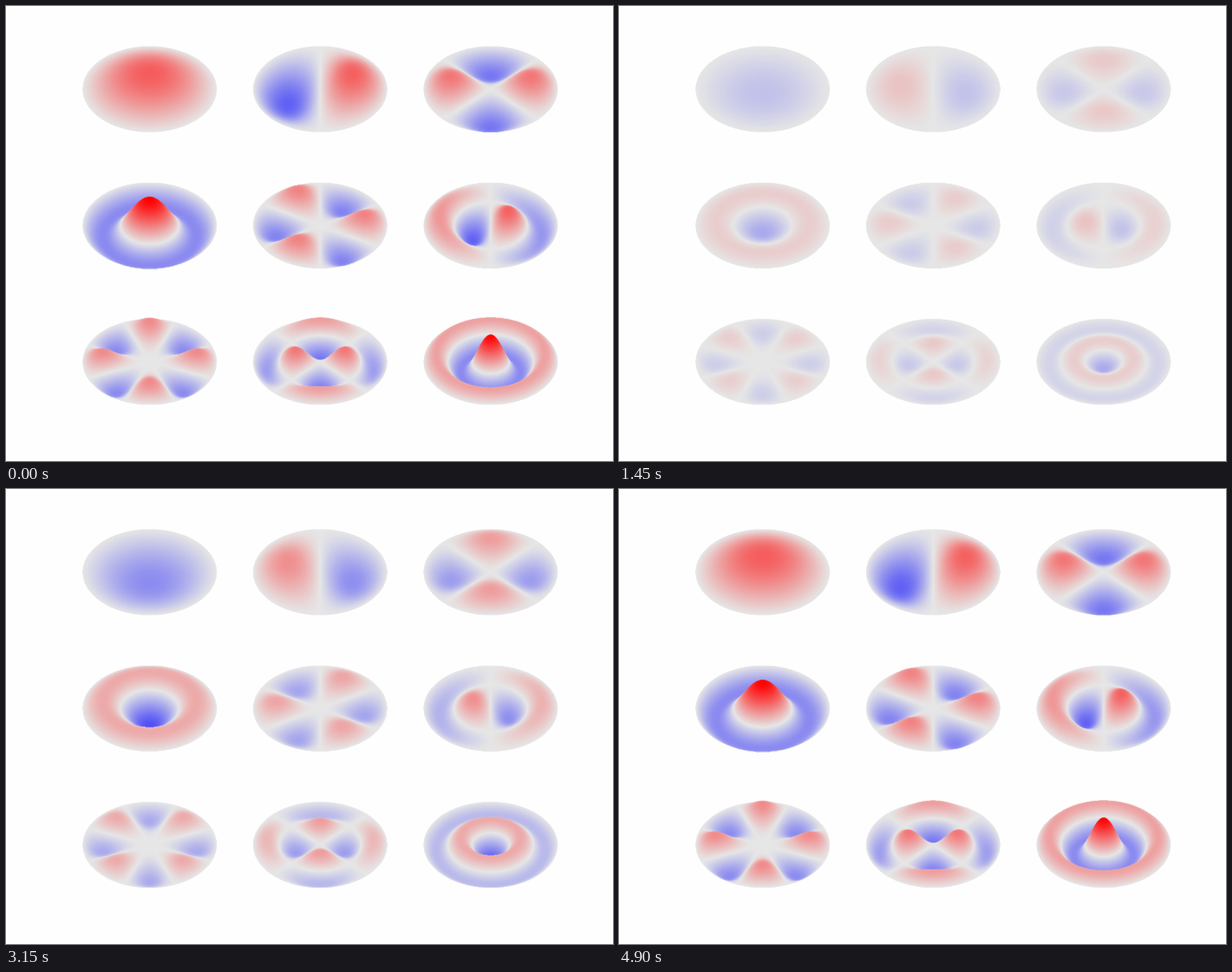
Recreate the animation shown at these times as an HTML page with a canvas. Size 700 by 525 pixels, loop 4950 ms.

```html
<!DOCTYPE html>
<html lang="en">
<head>
<meta charset="utf-8">
<title>Vibrating drum modes</title>
<style>
  html, body { margin: 0; width: 100%; height: 100%; overflow: hidden; background: #fefefe; }
  canvas { display: block; }
</style>
</head>
<body>
<canvas id="stage" width="700" height="525"></canvas>
<script>
const STEP = 50, STEPS = 99;            // ms per pose, poses per loop
const RX = 77.4, RY = 49.7, LIFT = 30.6; // tilted disk radii and height of a unit bump
const SCALE = 2;                         // supersampling
const PATCH_W = 160, PATCH_H = 130;
const LEVELS = 1000;                     // colour steps on each side of zero

const ctx = document.getElementById('stage').getContext('2d');
ctx.imageSmoothingQuality = 'high';

// Angular order, zero of the Bessel function, amplitude
const modes = [
  [0, 2.4048, 0.6], [1, 3.8317, 1], [2, 5.1356, 1],
  [0, 5.5201, 1],   [3, 6.3802, 1], [1, 7.0156, 1],
  [4, 7.5883, 1],   [2, 8.4172, 1], [0, 8.6537, 1]
];

// Blue - grey - red, packed as ABGR
const palette = new Uint32Array(2 * LEVELS + 1);
for (let i = 0; i < palette.length; i++) {
  const value = i / LEVELS - 1, size = Math.abs(value);
  const strong = Math.round(230 + 25 * size), weak = Math.round(230 * (1 - size));
  const [r, b] = value > 0 ? [strong, weak] : [weak, strong];
  palette[i] = (255 << 24 | b << 16 | weak << 8 | r) >>> 0;
}

function bessel(n, x) {
  const count = 32;
  let sum = 0;
  for (let i = 0; i < count; i++) {
    const a = (i + 0.5) * Math.PI / count;
    sum += Math.cos(n * a - x * Math.sin(a));
  }
  return sum / count;
}

// Each column of the disk holds heights ordered from back to front.
function buildColumns([order, zero, amplitude]) {
  const size = 2000;
  const radial = Float32Array.from({ length: size + 1 },
    (_, i) => amplitude * bessel(order, zero * i / size));
  const columns = [];
  for (let x = 0; x < PATCH_W * SCALE; x++) {
    const u = ((x + 0.5) / SCALE - PATCH_W / 2) / RX;
    if (Math.abs(u) >= 1) continue;
    const chord = Math.sqrt(1 - u * u);
    const count = Math.ceil(2 * chord * RY * SCALE) + 2;
    const heights = new Float32Array(count);
    for (let i = 0; i < count; i++) {
      const v = chord * (1 - 2 * i / (count - 1));
      const r = Math.min(1, Math.hypot(u, v));
      heights[i] = radial[Math.round(r * size)] * Math.cos(order * Math.atan2(v, u));
    }
    columns.push({ x, chord, heights });
  }
  return columns;
}

function createDrum(mode, index) {
  const canvas = document.createElement('canvas');
  canvas.width = PATCH_W * SCALE;
  canvas.height = PATCH_H * SCALE;
  const pen = canvas.getContext('2d');
  const image = pen.createImageData(canvas.width, canvas.height);
  return {
    canvas, pen, image,
    pixels: new Uint32Array(image.data.buffer),
    columns: buildColumns(mode),
    left: 165.7 + 196.6 * (index % 3) - PATCH_W / 2,
    top: 96 + 157.3 * Math.floor(index / 3) - PATCH_H / 2
  };
}

function paintColumn(pixels, { x, chord, heights }, swing) {
  const width = PATCH_W * SCALE, last = heights.length - 1;
  let y0 = 0, z0 = 0;
  for (let i = 0; i <= last; i++) {
    const z = heights[i] * swing;
    const v = chord * (1 - 2 * i / last);
    const y = (PATCH_H / 2 - RY * v - LIFT * z) * SCALE;
    if (i > 0) {
      const end = Math.ceil(Math.max(y0, y) - 0.5);
      for (let row = Math.ceil(Math.min(y0, y) - 0.5); row < end; row++) {
        const value = z0 + (z - z0) * (row + 0.5 - y0) / (y - y0);
        pixels[row * width + x] = palette[Math.round((value + 1) * LEVELS)];
      }
    }
    y0 = y;
    z0 = z;
  }
}

function drawDrum(drum, swing) {
  drum.pixels.fill(0);
  for (const column of drum.columns) paintColumn(drum.pixels, column, swing);
  drum.pen.putImageData(drum.image, 0, 0);
  ctx.drawImage(drum.canvas, drum.left, drum.top, PATCH_W, PATCH_H);
}

const drums = modes.map(createDrum);
let shown = -1;

function render() {
  const pose = Math.floor(performance.now() / STEP) % STEPS;
  if (pose !== shown) {
    shown = pose;
    ctx.fillStyle = '#fefefe';
    ctx.fillRect(0, 0, 700, 525);
    const swing = Math.cos(2 * Math.PI * pose / STEPS);
    for (const drum of drums) drawDrum(drum, swing);
  }
  requestAnimationFrame(render);
}
render();
</script>
</body>
</html>
```
